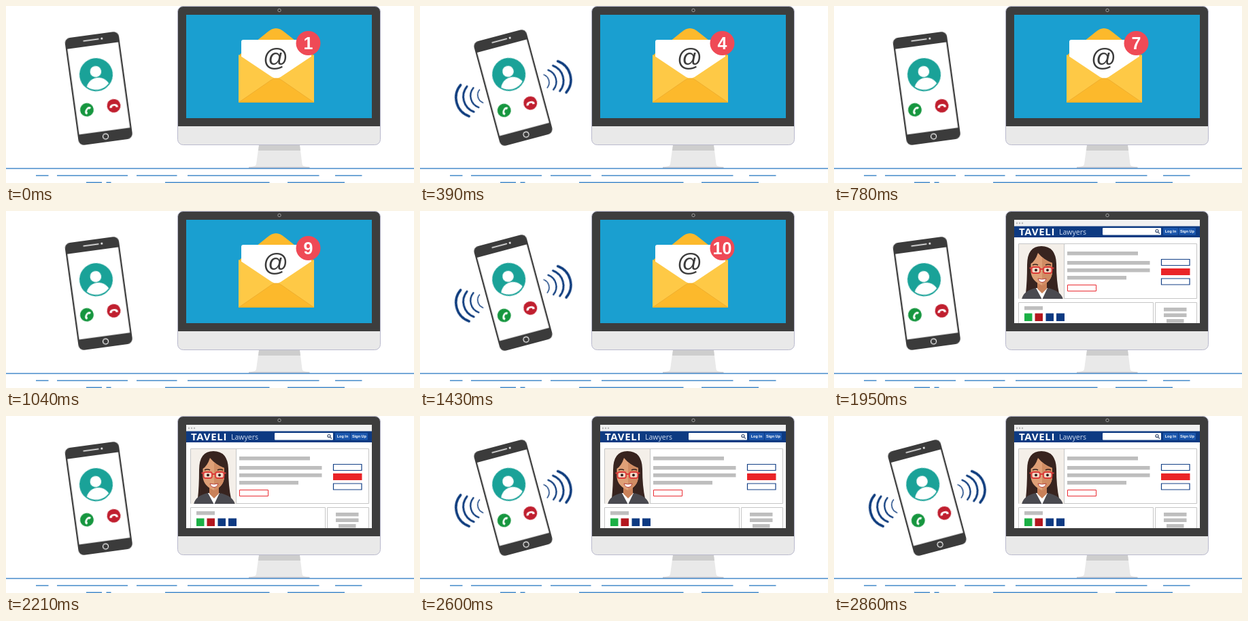
An HTML page without scripts that plays this animation: 600 px wide and 262 px high, repeating every 2.99 s.

```html
<!DOCTYPE html>
<html lang="en">
<head>
<meta charset="utf-8">
<title>Incoming calls and messages</title>
<style>
  html, body { margin: 0; width: 100%; height: 100%; overflow: hidden; background: #fff; }
  svg { display: block; width: 100%; height: 100%; }
  text { font-family: "Liberation Sans", Arial, sans-serif; }

  /* 23 beats of 130 ms */
  .phone, .page, .count { animation: 2.99s step-end infinite; }
  .phone { animation-name: ring; }
  .page { animation-name: page; }
  .count { animation-name: count; }

  /* currentColor paints the sound waves */
  @keyframes ring {
    0%, 8.69%, 17.39%, 26.08%, 34.78%, 43.47%, 52.17%, 56.52%, 65.21%, 73.91%, 82.6%, 91.3% {
      transform: translate(136.3px, 122px) rotate(-7.8deg);
      color: transparent;
    }
    4.34%, 13.04%, 21.73%, 30.43%, 39.13%, 47.82%, 60.86%, 69.56%, 78.26%, 86.95%, 95.65%, to {
      transform: translate(137px, 121px) rotate(-15deg);
      color: #0d3b7d;
    }
  }
  @keyframes page {
    0% { visibility: hidden; }
    56.52%, to { visibility: visible; }
  }
  @keyframes count {
    0% { transform: none; animation-timing-function: steps(9); }
    39.1%, to { transform: translateY(-360px); }
  }
</style>
</head>
<body>
<svg viewBox="0 0 600 262">
  <defs>
    <clipPath id="frame"><rect x="252.5" y=".5" width="298" height="205" rx="8"/></clipPath>
    <clipPath id="screen"><rect x="265" y="13" width="273" height="153"/></clipPath>
    <clipPath id="badge"><circle cx="444.5" cy="55" r="18"/></clipPath>
    <clipPath id="avatar"><circle cx="-1" cy="-20.7" r="22.5"/></clipPath>
    <clipPath id="portrait"><rect x="272" y="49" width="66" height="81"/></clipPath>
    <path id="handset" fill="#fff" d="M-6.2 2C-6.6-3.8 6.6-3.8 6.2 2L5.8 2.9 2.9 2.6 2.3.6Q0-.2-2.3.6L-2.9 2.6-5.8 2.9Z"/>
    <g id="waves" fill="none" stroke="currentColor" stroke-linecap="round">
      <path stroke-width="1.5" d="M48.5-10a12.4 12.4 0 0 1 0 20"/>
      <path stroke-width="2.3" d="M56.5-15a18.4 18.4 0 0 1 0 30"/>
      <path stroke-width="2.9" d="M65-19.5a24 24 0 0 1 0 39"/>
      <path stroke-width="3.5" d="M73.5-24a29.3 29.3 0 0 1 0 48"/>
    </g>
  </defs>

  <!-- desk -->
  <g fill="none" stroke="#4389c9" stroke-width="1.6">
    <path d="M44 251h18.500M75 251h104M192 251h59.500M267 251h193.500M484 251h39.500"/>
    <path d="M118 261.300h23M147.500 261.300h7M234 261.300h153.500M414 261.300h84"/>
  </g>

  <!-- monitor -->
  <path fill="#e9e9e9" d="M372 205h60l3.500 29q.5 3 4 3.500 6 .5 7 3h-90q1-2.500 7-3 4-.5 4.500-3.500Z"/>
  <path fill="#cdcdcd" d="M372 206h60l1 8h-62Z"/>
  <path fill="#c9c9cf" d="M357 238.300h89.500v1.700H357Z"/>
  <path stroke="#4389c9" stroke-width="1.6" d="M0 240.500h600"/>
  <g clip-path="url(#frame)">
    <path fill="#3d3d3d" d="M252 0h299v178H252Z"/>
    <path fill="#e9e9e9" d="M252 178h299v28H252Z"/>
  </g>
  <rect x="252.500" y=".5" width="298" height="205" rx="8" fill="none" stroke="#b9b9cd"/>
  <circle cx="402" cy="6.300" r="2.200" fill="#333" stroke="#bbb" stroke-width=".8"/>
  <path fill="#1a9fd0" d="M265 13h273v153H265Z"/>

  <!-- mail -->
  <path fill="#fcb92c" d="M342 75Q343 72 346 70L384 39Q397 27 410 39L449 70Q453 73 453 76V110H342Z"/>
  <rect x="346" y="50" width="103" height="70" rx="3" fill="#fff"/>
  <text x="396.500" y="89" font-size="37" text-anchor="middle" fill="#3b3b3b">@</text>
  <path fill="#fec946" d="M342 72 391 105Q397.500 109 404 105L453 72V143H342Z"/>
  <path fill="#fcb92c" stroke="#e9a62c" stroke-width=".7" d="M342.500 142.500 390 109.500Q397.500 104.500 405 109.500L452.500 142.500Z"/>
  <circle cx="444.500" cy="55" r="18" fill="#ef4a56"/>
  <g clip-path="url(#badge)">
    <g class="count" fill="#fff" font-size="25" font-weight="700" text-anchor="middle">
      <text x="444.500" y="64">1</text>
      <text x="444.500" y="104">2</text>
      <text x="444.500" y="144">3</text>
      <text x="444.500" y="184">4</text>
      <text x="444.500" y="224">5</text>
      <text x="444.500" y="264">6</text>
      <text x="444.500" y="304">7</text>
      <text x="444.500" y="344">8</text>
      <text x="444.500" y="384">9</text>
      <text x="444.500" y="424">10</text>
    </g>
  </g>

  <!-- web page -->
  <g class="page" clip-path="url(#screen)">
    <path fill="#fff" d="M265 13h273v153H265Z"/>
    <path fill="#f1f1f1" d="M265 13h273v10H265Z"/>
    <g fill="#b8b8b8">
      <circle cx="269" cy="18" r="1.200"/><circle cx="273" cy="18" r="1.200"/><circle cx="277" cy="18" r="1.200"/>
    </g>
    <path fill="#0d3a82" d="M265 22.500h273v16.500H265Z"/>
    <text x="272" y="35.500" font-size="15" font-weight="700" letter-spacing=".7" fill="#fff" style="font-family:'Open Sans',sans-serif">TAVELI</text>
    <text x="331" y="34.500" font-size="10.500" fill="#d3def2" style="font-family:'Open Sans',sans-serif">Lawyers</text>
    <rect x="395" y="25" width="86" height="10.500" rx="1" fill="#fff"/>
    <path fill="none" stroke="#33476b" stroke-width="1.200" d="M476.500 31.200l2.300 2.300M477 29.500a2 2 0 1 0-4 0a2 2 0 1 0 4 0"/>
    <g fill="#1c57ad">
      <rect x="484" y="25" width="22" height="10.500" rx="1"/>
      <rect x="507" y="25" width="25" height="10.500" rx="1"/>
    </g>
    <g font-size="5.500" font-weight="700" fill="#fff" text-anchor="middle">
      <text x="495" y="32.200">Log In</text><text x="519.500" y="32.200">Sign Up</text>
    </g>

    <g fill="none" stroke="#c6c6c6">
      <path d="M271.500 48.500h262v81h-262ZM338.500 48.500v81M271.500 180v-44.500h198V180M472.500 180v-44.500h61V180"/>
    </g>
    <g clip-path="url(#portrait)">
      <path fill="#f4efe9" d="M272 49h66v81h-66Z"/>
      <path fill="#38241f" d="M282 122Q284 104 284 80 284 52 305 52 326 52 327 78 327 104 331 122 318 127 305 125 292 127 282 122Z"/>
      <path fill="#4a4a50" d="M276 131Q278 118 297 114H314Q334 118 337 131Z"/>
      <path fill="#fff" d="M297 114h17l-8 17Z"/>
      <path fill="#c98159" d="M299 102h14v13l-7 7-7-7Z"/>
      <path fill="#dfa077" d="M289.500 78Q296 74 300 62 308 72 321 77V91Q320 104 306 110 291 104 289.500 91Z"/>
      <path fill="#d08c63" d="M306 69Q312 74 321 77V91Q320 104 306 110Z"/>
      <path fill="none" stroke="#38241f" stroke-width="1.400" d="M292 80q4-2 8 0M311 80q4-2 8 0"/>
      <g fill="#f3d6c4" stroke="#dc3b38" stroke-width="1.800">
        <rect x="290.500" y="83" width="12.500" height="9" rx="3"/>
        <rect x="308" y="83" width="12.500" height="9" rx="3"/>
        <path fill="none" d="M303 86h5M287.500 84.500h3M320.500 84.500h3"/>
      </g>
      <g fill="#2b1b18"><circle cx="297" cy="87.500" r="1.900"/><circle cx="314" cy="87.500" r="1.900"/></g>
      <path fill="#fff" stroke="#b5403a" d="M300 100q6 2 12 0-1.500 5.500-6 5.500t-6-5.500Z"/>
    </g>

    <path fill="#bebebe" d="M343 60h104v5.500H343ZM343 74h121.500v5.500H343ZM343 85h121.500v5.500H343ZM343 96h87v5.500H343ZM280 141h27v5.500H280ZM485 143h33.500v5.500H485ZM485 151.500h33.500v5.500H485ZM489 160h25.500v5.500H489Z"/>
    <path fill="none" stroke="#ea2a30" d="M343.500 109.500h42v9h-42Z"/>
    <path fill="#ea2428" d="M481 85h42.500v10H481Z"/>
    <path fill="none" stroke="#123f86" stroke-width="1.200" d="M481.500 71.500h41.500v9h-41.500ZM481.500 100h41.500v9h-41.500Z"/>
    <path fill="#1bb045" d="M280 151.500h11.500V163H280Z"/>
    <path fill="#b3161e" d="M295.500 151.500H307V163H295.500Z"/>
    <path fill="#0d3a82" d="M311.500 151.500H323V163H311.500ZM327 151.500h12V163H327Z"/>
  </g>

  <!-- phone -->
  <g class="phone">
    <use href="#waves" y="3"/>
    <use href="#waves" transform="scale(-1 1)"/>
    <rect x="-40" y="-80" width="80" height="160" rx="8" fill="#3b3b3b"/>
    <path fill="#fff" d="M-37.700-64h75.400V63.700h-75.400Z"/>
    <path stroke="#fff" stroke-width="1.500" stroke-linecap="round" d="M-12.500-72.500h22"/>
    <circle cx="14.500" cy="-72.500" r="1.400" fill="#fff"/>
    <circle cx=".5" cy="71.800" r="4" fill="none" stroke="#fff" stroke-width="1.200"/>
    <circle cx="-1" cy="-20.700" r="24.500" fill="#1aa298"/>
    <g fill="#fff" clip-path="url(#avatar)">
      <circle cx="-1" cy="-25.300" r="8.300"/>
      <ellipse cx="-.5" cy="1" rx="17.500" ry="17"/>
    </g>
    <circle cx="-21.500" cy="29" r="10" fill="#16963f"/>
    <use href="#handset" transform="translate(-21 29.500) rotate(-52)"/>
    <circle cx="18.500" cy="28.400" r="10" fill="#c01f2f"/>
    <use href="#handset" x="18.500" y="28.400"/>
  </g>
</svg>
</body>
</html>
```
